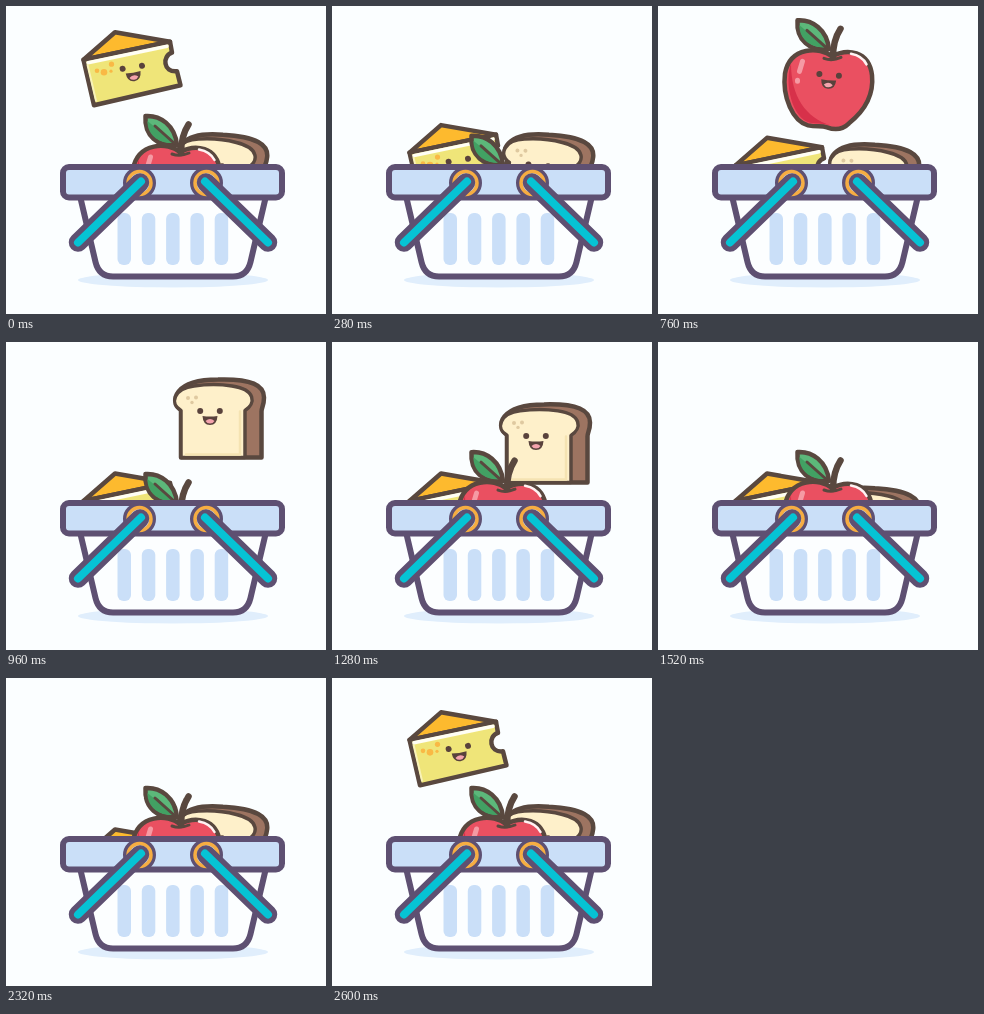
Animation of 320x308 px, one loop 2640 ms. Source, as an HTML page:

```html
<!DOCTYPE html>
<html lang="en">
<head>
<meta charset="utf-8">
<title>Grocery basket</title>
<style>
html, body { margin: 0; width: 100%; height: 100%; overflow: hidden; background: #fbfeff; }
svg { display: block; width: 100vw; height: 100vh; }
.food { stroke: #59483f; stroke-width: 4.5; stroke-linejoin: round; stroke-linecap: round; }
.flat { stroke: none; }
.line { fill: none; }
.basket { stroke: #5e5072; stroke-width: 6; stroke-linejoin: round; stroke-linecap: round; }
.ink { fill: #59423c; stroke: none; }
</style>
</head>
<body>
<svg viewBox="0 0 320 308">
  <defs>
    <clipPath id="above"><rect width="320" height="176"/></clipPath>
    <g id="face">
      <circle class="ink" cx="-9.800" cy="-7.500" r="3"/>
      <circle class="ink" cx="9.800" cy="-7.500" r="3"/>
      <path class="ink" d="M-7.500-2.500Q0-1.500 7.500-2.500Q7 6.500 0 6.500Q-7 6.500-7.500-2.500Z"/>
      <path d="M-4.500 2.500Q0-1.500 4.500 2.500Q3 5 0 5Q-3 5-4.500 2.500Z" fill="#f4a3ad" stroke="none"/>
    </g>
    <g id="handle">
      <circle cx="133.500" cy="177" r="11.500" fill="none" stroke="#5e5072" stroke-width="10"/>
      <circle cx="133.500" cy="177" r="11.500" fill="#cadff8" stroke="#f6ad42" stroke-width="3.500"/>
      <path d="M72 236.500L134 176.500" stroke="#5e5072" stroke-width="18.500" stroke-linecap="round"/>
      <path d="M72 236.500L135 175.500" stroke="#06c3d4" stroke-width="8" stroke-linecap="round"/>
    </g>
  </defs>
  <rect width="320" height="308" fill="#fbfeff"/>
  <ellipse cx="167" cy="274" rx="95" ry="7.500" fill="#e0eefc"/>

  <g id="foods" class="food" clip-path="url(#above)">
    <g id="cheese">
      <path d="M77.500 53L109 25.500L164 35Z" fill="#fdba2e"/>
      <path d="M77.500 53L164 35L166 46C156 49 157 66 171 64.500L174.500 78.500L88 98.500Z" fill="#efe579"/>
      <path class="line" d="M82 56L161 39.500" stroke="#fffef4" stroke-width="3.500"/>
      <path class="line" d="M81.500 58L90 94" stroke="#f8f2b8" stroke-width="2"/>
      <g class="flat" fill="#f9b945">
        <circle cx="98" cy="65.500" r="3.300"/><circle cx="91" cy="64" r="2.300"/>
        <circle cx="105.500" cy="57.500" r="2.600"/><circle cx="105" cy="64.500" r="1.600"/>
      </g>
      <use href="#face" transform="translate(127.500 68) rotate(-9)"/>
    </g>
    <g id="bread">
      <path d="M175 114V66C163 58 168 36 212 36C246 35 258 42 258 54C258 62 255.500 64 255.500 68V114Z" fill="#9d7461"/>
      <path d="M175 114V67C163 60 168 45 188 42.500Q208 39.500 226 42.500C250 46 250 60 239 67V114Z" fill="#fef0ca" stroke-width="3.500"/>
      <path class="line" d="M180 111H234V68" stroke="#f5e3b2" stroke-width="2.500"/>
      <g class="flat" fill="#dfc9a0">
        <circle cx="182" cy="54.500" r="2"/><circle cx="190" cy="54" r="2"/><circle cx="186" cy="59" r="1.700"/>
      </g>
      <use href="#face" transform="translate(204 75)"/>
    </g>
    <g id="apple">
      <path d="M174 51C162 41 132 41 127 68C124 92 135 116 150 120C159 122 163 120 169 122C177 125 185 124 191 118C206 106 216 90 214 70C211 45 189 43 174 51Z" fill="#ea5061"/>
      <path class="flat" d="M133 58C126 78 134 113 152 117.500C160 119 166 118 172 120C148 112 133 92 133 58Z" fill="#d7314a"/>
      <path class="line" d="M193 48.500C201 50 206 54 208.500 59" stroke="#fff3f3" stroke-width="2.500"/>
      <path class="line" d="M144.500 56L141.500 66M139.500 75V76" stroke="#f59aa4" stroke-width="5"/>
      <path class="line" d="M166 53Q174 56 183 52" stroke-width="3"/>
      <path class="line" d="M175 52Q175 35 182.500 23.500" stroke-width="6.500"/>
      <path d="M139.500 15C154 14 169 24 171 44C152 46 138 35 139.500 15Z" fill="#5cb87a"/>
      <path class="flat" d="M141.500 20L168 42C153 43 141 34 141.500 20Z" fill="#42a163"/>
      <path class="line" d="M149 25L168 42" stroke-width="3"/>
      <use href="#face" transform="translate(170.500 77) rotate(5)"/>
    </g>
  </g>

  <path class="basket" d="M74 190L89.500 256Q93 270.500 107 270.500H227Q241 270.500 244.500 256L260 190Z" fill="#fcfeff"/>
  <g id="slots" fill="#cadff8"></g>
  <rect class="basket" x="57" y="161" width="219" height="30.500" rx="6" fill="#cadff8"/>
  <use href="#handle"/>
  <use href="#handle" transform="matrix(-1 0 0 1 334 0)"/>
</svg>
<script>
const LOOP = 2640, STEP = 40;
const $ = id => document.getElementById(id);

const ease = {
  hold: p => p,
  up: p => 1 - (1 - p) ** 2,
  fall: p => p * p,
  soft: p => p < .5 ? 2 * p * p : 1 - 2 * (1 - p) ** 2
};

// Each jump: start time, then [ms after start, offset from rest, easing]
const jumps = {
  cheese: { start: 2130, rest: 106, keys: [[0, 0], [160, 20, 'soft'], [275, 20, 'hold'], [550, -108, 'up'], [832, 24, 'fall'], [1310, 0, 'soft']] },
  apple: { start: 160, rest: 95, keys: [[0, 0], [130, 20, 'soft'], [240, 20, 'hold'], [521, -106, 'up'], [799, 22, 'fall'], [1140, 0, 'soft']] },
  bread: { start: 530, rest: 92, keys: [[0, 0], [90, 10, 'soft'], [240, 10, 'hold'], [554, -109, 'up'], [892, 20, 'fall'], [1290, 0, 'soft']] }
};

function offset({ start, keys }, t) {
  const u = (t - start + LOOP) % LOOP;
  for (let i = 1; i < keys.length; i++) {
    const [a, from] = keys[i - 1], [b, to, kind] = keys[i];
    if (u < b) return from + (to - from) * ease[kind]((u - a) / (b - a));
  }
  return 0;
}

for (let i = 0; i < 5; i++) {
  $('slots').insertAdjacentHTML('beforeend',
    `<rect x="${111.5 + i * 24.3}" y="207" width="13.500" height="52" rx="6"/>`);
}

let breadInFront;
function draw(t) {
  for (const name in jumps) {
    const dy = offset(jumps[name], t);
    let move = `translate(0 ${jumps[name].rest + dy})`;
    if (name === 'bread') {
      // Leans to the right as it settles
      const lean = Math.min(1, Math.max(0, 1 + dy / 40));
      move = `translate(${2 * lean} ${jumps.bread.rest + dy}) rotate(${5 * lean} 205 70)`;
    }
    $(name).setAttribute('transform', move);
  }
  const front = t >= 240 && t < 880;
  if (front !== breadInFront) {
    $('foods').append($(front ? 'bread' : 'apple'));
    breadInFront = front;
  }
}

const began = performance.now();
function tick() {
  const t = (performance.now() - began) % LOOP;
  draw(Math.floor(t / STEP) * STEP);
  requestAnimationFrame(tick);
}
tick();
</script>
</body>
</html>
```
